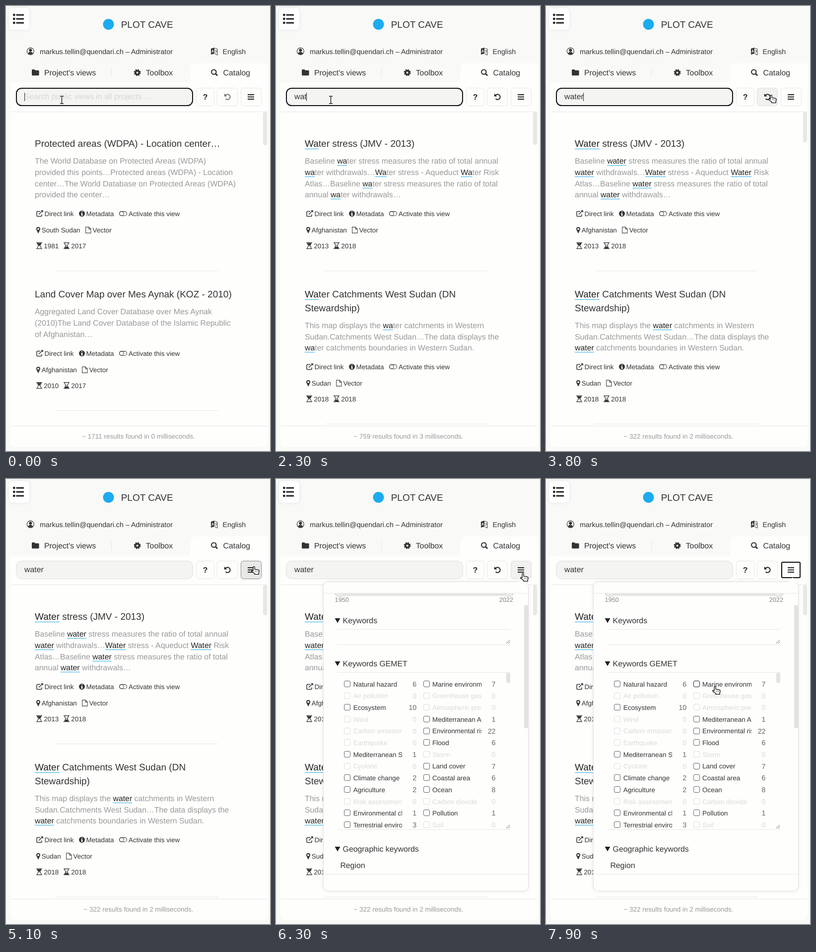
These frames come from a looping animation (532x898 px, 8 s). An HTML page:

```html
<!DOCTYPE html>
<html lang="en">
<head>
<meta charset="utf-8">
<title>Catalog search</title>
<style>
  html, body { margin: 0; width: 100%; height: 100%; overflow: hidden; background: #f9f9f8; }
  svg { display: block; width: 532px; height: 898px; }
  text { font-family: "Liberation Sans", Arial, sans-serif; white-space: pre; text-rendering: geometricPrecision; }
</style>
</head>
<body>
<svg id="stage" viewBox="0 0 532 898" xmlns="http://www.w3.org/2000/svg">
  <defs>
    <filter id="soft" x="-20%" y="-20%" width="140%" height="140%">
      <feDropShadow dx="0" dy="0" stdDeviation="3" flood-color="#000" flood-opacity=".09"/>
    </filter>
    <clipPath id="listClip"><path d="M9 214H527V847H9Z"/></clipPath>
    <clipPath id="labelClip"><path d="M156 391H254V707H156ZM315 391H414V707H315Z"/></clipPath>
    <clipPath id="optionClip"><path d="M124 391H472V707H124Z"/></clipPath>
    <clipPath id="sliderClip"><path d="M97 231H508V260H97Z"/></clipPath>
    <g id="i-link" fill="none" stroke="#333" stroke-width="1.5">
      <path d="M8 2.5H2.5Q1 2.5 1 4V11Q1 12.5 2.5 12.5H9.5Q11 12.5 11 11V8.5M5 8.5L12.5 1.5"/>
      <path d="M9 .3H13.8V5Z" fill="#333" stroke="none"/>
    </g>
    <g id="i-info">
      <circle cx="6" cy="6" r="6" fill="#333"/>
      <path d="M5 1.8H7.2V3.6H5ZM4.2 5H7.2V8.7H8V10H4.2V8.7H5V6.2H4.2Z" fill="#fff"/>
    </g>
    <g id="i-toggle" fill="none" stroke="#444" stroke-width="1.1">
      <rect x=".6" y=".6" width="14.8" height="8.6" rx="4.3"/><circle cx="4.9" cy="4.9" r="4.3"/>
    </g>
    <path id="i-pin" fill="#333" fill-rule="evenodd" d="M4 0A4 4 0 0 1 8 4C8 6 5.6 9 4.6 12Q4 13 3.4 12C2.4 9 0 6 0 4A4 4 0 0 1 4 0ZM4 2A2 2 0 1 0 4 6A2 2 0 1 0 4 2Z"/>
    <path id="i-file" fill="none" stroke="#444" stroke-width="1.1" d="M.6 .6H7L11 4.6V12.6H.6ZM7 .6V4.6H11"/>
    <path id="i-glass" fill="none" stroke="#333" stroke-width="1.2" d="M0 .6H12M0 12.6H12M2 1C2 4 4 5.5 5 6.6C4 7.7 2 9 2 12M10 1C10 4 8 5.5 7 6.6C8 7.7 10 9 10 12"/>
    <path id="sand-top" d="M2.3 1.5H9.7Q9 5 6 6.6Q3 5 2.3 1.5Z" fill="#333"/>
    <path id="sand-low" d="M2.3 12Q3 9 6 8.6Q9 9 9.7 12Z" fill="#333"/>
  </defs>
</svg>
<script>
const LOOP = 8000;
const BASE = 15.84, SMALL = BASE * .85, MID = BASE * .9, BIG = BASE * 1.2;
const INK = '#333', PALE = '#999', RULE = '#e7e7e6', BLUE = '#27abe8';
const stage = document.getElementById('stage');

function add(parent, tag, attrs = {}, content) {
  const el = document.createElementNS(stage.namespaceURI, tag);
  for (const key in attrs) el.setAttribute(key, attrs[key]);
  if (content !== undefined) el.textContent = content;
  return parent.appendChild(el);
}
const group = (parent, attrs) => add(parent, 'g', attrs);
const label = (parent, x, y, size, content, fill = INK, more = {}) =>
  add(parent, 'text', { x, y: Math.round(y), 'font-size': size, fill, ...more }, content);
const box = (parent, x, y, width, height, rx, fill, stroke = 'none', more = {}) =>
  add(parent, 'rect', { x, y, width, height, rx, fill, stroke, ...more });
const path = (parent, d, fill = 'none', stroke = 'none', width = 1) =>
  add(parent, 'path', { d, fill, stroke, 'stroke-width': width });
const rule = (parent, x1, x2, y) => path(parent, `M${x1} ${y + .5}H${x2}`, 'none', RULE);
const icon = (parent, name, x, y) => add(parent, 'use', { href: '#' + name, x, y });
const show = (el, on) => el.setAttribute('display', on ? 'inline' : 'none');

// Text whose words starting with `term` are darkened and underlined.
function marked(parent, x, y, size, content, fill, term, gap) {
  const el = label(parent, x, y, size, '', fill);
  const parts = term ? content.split(new RegExp(`\\b(${term})`, 'i')) : [content];
  const spans = [];
  let at = 0;
  parts.forEach((part, i) => {
    if (!part) return;
    add(el, 'tspan', i % 2 ? { fill: '#222' } : {}, part);
    if (i % 2) spans.push([at, at + part.length - 1]);
    at += part.length;
  });
  for (const [from, to] of spans) {
    const left = el.getStartPositionOfChar(from).x, right = el.getEndPositionOfChar(to).x;
    path(parent, `M${left} ${Math.round(y) + gap + .5}H${right}`, 'none', BLUE);
  }
}

function card(parent, top, item, term) {
  const titleStep = 27.5, bodyStep = 22.65;
  item.title.forEach((row, i) => marked(parent, 58, top + i * titleStep, BIG, row, INK, term, 4));
  let y = top + (item.title.length - 1) * titleStep + 34.4;
  item.body.forEach((row, i) => marked(parent, 58, y + i * bodyStep, BASE, row, PALE, term, 3));
  y = Math.round(y + (item.body.length - 1) * bodyStep + 37.9);
  icon(parent, 'i-link', 61, y - 12);
  label(parent, 77.5, y, SMALL, 'Direct link');
  icon(parent, 'i-info', 147, y - 11);
  label(parent, 161.5, y, SMALL, 'Metadata');
  icon(parent, 'i-toggle', 228, y - 10);
  label(parent, 247, y, SMALL, 'Activate this view');
  y += 33;
  icon(parent, 'i-pin', 61, y - 11);
  label(parent, 71.8, y, SMALL, item.place);
  icon(parent, 'i-file', item.fileX, y - 11.5);
  label(parent, item.fileX + 14.6, y, SMALL, 'Vector');
  y += 32;
  item.years.forEach((year, i) => {
    const x = 61 + i * 55;
    icon(parent, 'i-glass', x, y - 12);
    icon(parent, i ? 'sand-low' : 'sand-top', x, y - 12);
    label(parent, x + 15.2, y, SMALL, year);
  });
  rule(parent, 99, 427, y + 45);
}

function results(items, count, thumb, term) {
  const all = group(stage), list = group(all, { 'clip-path': 'url(#listClip)' });
  items.forEach((item, i) => card(list, 284 + i * 304, item, term));
  box(all, 518, 214, 8, thumb, 4, '#e7e7e6');
  label(all, 267, 873, SMALL, count, PALE, { 'text-anchor': 'middle' });
  return all;
}

// Page and header
box(stage, 0, 0, 532, 898, 0, '#f9f9f8');
path(stage, 'M9 154H371V128Q371 116 383 116H527V878Q527 890 515 890H21Q9 890 9 878Z', '#fefefd');
box(stage, 6, 4, 41, 44, 8, '#fefefe', 'none', { filter: 'url(#soft)' });
for (const y of [18, 26, 34]) {
  add(stage, 'circle', { cx: 16.3, cy: y, r: 2.4, fill: '#222' });
  path(stage, `M20.5 ${y}H36`, 'none', '#222', 3);
}
add(stage, 'circle', { cx: 206.5, cy: 37, r: 11, fill: '#1cabee' });
label(stage, 231.7, 44, BIG, 'PLOT CAVE');

add(stage, 'circle', { cx: 49.3, cy: 91.3, r: 7, fill: 'none', stroke: INK, 'stroke-width': 1.2 });
add(stage, 'circle', { cx: 49.3, cy: 89.2, r: 3, fill: INK });
path(stage, 'M44.3 95.5Q46 92.6 49.3 92.6T54.3 95.5Q49.3 100 44.3 95.5Z', INK);
label(stage, 68, 97, MID, 'markus.tellin@quendari.ch – Administrator');
path(stage, 'M413 86L420 84V96L413 98Z', INK);
path(stage, 'M420.5 85L426 87V99L420.5 96.5', 'none', INK, 1);
path(stage, 'M414.7 94.5L416.5 88L418.4 93.5M415.3 92.3L418 91.6', 'none', '#fff', 1);
path(stage, 'M421.5 90L425 91.2M423.2 89V91M422 95L424.6 91', 'none', INK, .9);
label(stage, 436.5, 97, MID, 'English');

path(stage, 'M52 129.5Q52 128 53.5 128H57Q58.5 128 58.5 129.8H65Q66.6 129.8 66.6 131.3V138.7Q66.6 140.2 65 140.2H53.5Q52 140.2 52 138.7Z', INK);
label(stage, 77, 140, BASE, "Project's views");
path(stage, 'M212.5 125V144', 'none', RULE);
add(stage, 'circle', { cx: 264.6, cy: 134.4, r: 3.7, fill: 'none', stroke: INK, 'stroke-width': 3.4 });
add(stage, 'circle', { cx: 264.6, cy: 134.4, r: 5.8, fill: 'none', stroke: INK, 'stroke-width': 2.4, 'stroke-dasharray': '2.6 1.955' });
label(stage, 281.7, 140, BASE, 'Toolbox');
add(stage, 'circle', { cx: 418.8, cy: 133.2, r: 4.7, fill: 'none', stroke: INK, 'stroke-width': 2.2 });
path(stage, 'M422.3 136.8L426.2 140.6', 'none', INK, 2.8);
label(stage, 437.6, 140, BASE, 'Catalog');

// Search row
box(stage, 20.5, 165.5, 356, 36, 11, '#f4f4f2', '#e0e0de');
const focusLine = box(stage, 21, 166, 355, 35, 10.5, 'none', '#111', { 'stroke-width': 2 });
const hint = label(stage, 37, 188, BASE, 'Search public views in all projects …', '#d6d6d4');
const query = label(stage, 37, 188, BASE, '');
const caret = path(stage, '', 'none', '#222');
const buttons = [[383, 37], [425, 42], [473, 42]].map(([x, w]) => ({
  x, w, el: box(stage, x + .5, 165.5, w - 1, 36, 5, '#fdfdfc', RULE)
}));
label(stage, 401.7, 189, BASE, '?', '#222', { 'text-anchor': 'middle', 'font-weight': 'bold' });
const undo = group(stage);
const undoArc = path(undo, 'M442.2 180.2A5.3 5.3 0 1 1 442.6 187.2', 'none', INK, 2);
const undoTip = path(undo, 'M439.8 176.8V182.6H445.6Z', INK);
path(stage, 'M487 179H500M487 183.5H500M487 188H500', 'none', '#222', 2);
const ring = box(stage, 475, 168, 37, 31, 2, 'none', '#111', { 'stroke-width': 2 });
rule(stage, 10, 527, 213);
rule(stage, 10, 527, 847);

// Result lists
const firstItems = [
  { title: ['Protected areas (WDPA) - Location center…'],
    body: ['The World Database on Protected Areas (WDPA)', 'provided this points…Protected areas (WDPA) - Location',
      'center…The World Database on Protected Areas (WDPA)', 'provided the center…'],
    place: 'South Sudan', fileX: 160, years: ['1981', '2017'] },
  { title: ['Land Cover Map over Mes Aynak (KOZ - 2010)'],
    body: ['Aggregated Land Cover Database over Mes Aynak', '(2010)The Land Cover Database of the Islamic Republic', 'of Afghanistan…'],
    place: 'Afghanistan', fileX: 153, years: ['2010', '2017'] }
];
const waterItems = [
  { title: ['Water stress (JMV - 2013)'],
    body: ['Baseline water stress measures the ratio of total annual', 'water withdrawals…Water stress - Aqueduct Water Risk',
      'Atlas…Baseline water stress measures the ratio of total', 'annual water withdrawals…'],
    place: 'Afghanistan', fileX: 153, years: ['2013', '2018'] },
  { title: ['Water Catchments West Sudan (DN', 'Stewardship)'],
    body: ['This map displays the water catchments in Western', 'Sudan.Catchments West Sudan…The data displays the',
      'water catchments boundaries in Western Sudan.'],
    place: 'Sudan', fileX: 121, years: ['2018', '2018'] }
];
const lists = [
  results(firstItems, '~ 1711 results found in 0 milliseconds.', 67),
  results(waterItems, '~ 759 results found in 3 milliseconds.', 66, 'wa'),
  results(waterItems, '~ 322 results found in 2 milliseconds.', 61, 'water')
];

// Filter popup
const popup = group(stage);
box(popup, 95.5, 207.5, 413, 624, 10, '#fefefd', '#e2e2e1', { filter: 'url(#soft)' });
path(popup, 'M488 209L497 198.5L506 209Z', '#fefefd');
rule(popup, 96, 508, 230);
const slider = group(popup, { 'clip-path': 'url(#sliderClip)' });
box(slider, 119, 229, 359, 6, 3, '#e6e6e5', '#d8d8d7');
for (const cx of [128.5, 468.5]) add(slider, 'circle', { cx, cy: 228, r: 9.5, fill: '#ececeb', stroke: '#d0d0cf' });
label(popup, 118.6, 248, BASE * .8, '1950', '#888');
label(popup, 449.8, 248, BASE * .8, '2022', '#888');
function section(y, content) {
  path(popup, `M118.5 ${y - 10}H129.5L124 ${y - .5}Z`, '#222');
  label(popup, 134.6, y, BASE, content);
}
const grip = (x, y) => path(popup, `M${x} ${y}L${x + 7} ${y - 7}M${x + 4} ${y}L${x + 7} ${y - 3}`, 'none', '#666');
section(291, 'Keywords');
rule(popup, 124, 472, 303);
rule(popup, 124, 472, 334);
grip(464, 332);
section(378, 'Keywords GEMET');
rule(popup, 124, 472, 390);
box(popup, 464, 391, 8, 21, 4, '#e2e2e1');

const options = [
  ['Natural hazard', 6, 'Marine environment', 7], ['Air pollution', 0, 'Greenhouse gas', 0],
  ['Ecosystem', 10, 'Atmospheric precipitation', 0], ['Wind', 0, 'Mediterranean Area', 1],
  ['Carbon emission', 0, 'Environmental risk', 22], ['Earthquake', 0, 'Flood', 6],
  ['Mediterranean Sea', 1, 'Storm', 0], ['Cyclone', 0, 'Land cover', 7],
  ['Climate change', 2, 'Coastal area', 6], ['Agriculture', 2, 'Ocean', 8],
  ['Risk assessment', 0, 'Carbon dioxide', 0], ['Environmental change', 1, 'Pollution', 1],
  ['Terrestrial environment', 3, 'Soil', 0]
];
const names = group(popup, { 'clip-path': 'url(#labelClip)' });
const marks = group(popup, { 'clip-path': 'url(#optionClip)' });
let hoverCheck;
options.forEach((row, i) => [0, 1].forEach(col => {
  const name = row[col * 2], count = row[col * 2 + 1], y = 414 + i * 23.67, x = col ? 297 : 137;
  const check = box(marks, x + .5, Math.round(y) - 6.5, 12, 12, 2.5, '#fff', count ? '#666' : '#ddd');
  if (name.startsWith('Marine')) hoverCheck = check;
  label(names, col ? 315 : 155.7, y + 4.8, SMALL, name, count ? INK : '#dadad9');
  label(marks, col ? 442.5 : 283.3, y + 5, MID, count, count ? '#666' : '#dadad9', { 'text-anchor': 'end' });
}));
rule(popup, 124, 472, 707);
grip(464, 705);
section(752, 'Geographic keywords');
label(popup, 129.4, 785, BASE, 'Region');
rule(popup, 96, 508, 797);
box(popup, 500, 254, 8.5, 249, 4, '#e2e2e1');

// Pointer shapes, each with its hot spot at the origin
const pointer = group(stage);
const beam = group(pointer, { transform: 'translate(.5 .5)' });
const beamPath = 'M-3.5 -7.5H-1.5L0 -6.5L1.5 -7.5H3.5M0 -6.5V6.5M-3.5 7.5H-1.5L0 6.5L1.5 7.5H3.5';
path(beam, beamPath, 'none', '#fff', 3);
path(beam, beamPath, 'none', '#111', 1.4);
const hand = group(pointer);
path(hand, 'M-2 8.5V1.2Q-2 -.4 -.4 -.4T1.2 1.2V5.2L7.5 6.1Q10.4 6.5 10.2 9L9.3 12.2V15.3H1V13.6L-4.8 9.6Q-5.8 8.4 -4.8 7.6Q-3.6 7 -2 8.5Z', '#fff', '#111', 1.3);
path(hand, 'M2.3 8V10M4.8 8.4V10.2M7.2 8.8V10.4', 'none', '#111', .9);
const arrow = path(pointer, 'M0 0V14L3.3 11L5.6 16L7.9 15L5.7 10.2H10Z', '#111', '#fff', 1);

const track = [
  [0, 112, 189], [100, 110, 189], [3300, 110, 189], [3400, 135, 188], [3500, 205, 186], [3600, 310, 183],
  [3700, 405, 181], [3800, 454, 180], [3900, 480, 179], [4000, 497, 177], [4100, 500, 177], [6200, 500, 177],
  [6400, 495, 205], [6600, 474, 295], [6800, 432, 382], [6900, 407, 409], [7000, 365, 415], [7100, 345, 418],
  [7300, 337, 418], [7400, 337, 418], [7500, 331, 420], [7700, 314, 423], [7900, 341, 419]
];
function pointerAt(t) {
  const next = track.findIndex(key => key[0] > t);
  if (next < 0) return track[track.length - 1].slice(1);
  const a = track[next - 1], b = track[next], k = (t - a[0]) / (b[0] - a[0]);
  return [1, 2].map(i => a[i] + (b[i] - a[i]) * k);
}

const typing = [1900, 2000, 2300, 2400, 2500];
const blinks = [300, 900, 1500, 1900, 3100, 3700, 4300, 4900];

function draw(time) {
  const t = Math.floor(time / 100) * 100;
  const passed = times => times.filter(at => t >= at).length;
  const focused = t < 4900, pressed = t >= 4900 && t < 5300, open = t >= 5300;

  query.textContent = 'water'.slice(0, passed(typing));
  show(hint, !query.textContent);
  show(focusLine, focused);
  show(caret, focused && passed(blinks) % 2 === 0);
  const end = Math.floor(37 + (query.textContent ? query.getComputedTextLength() : 0)) + .5;
  caret.setAttribute('d', `M${end} 175V192`);

  const current = passed([2300, 2800]);
  lists.forEach((list, i) => show(list, i === current));
  const tone = t < 2300 ? '#777' : '#222';
  undoArc.setAttribute('stroke', tone);
  undoTip.setAttribute('fill', tone);

  const [x, y] = pointerAt(t);
  const onRow = y < 203;
  buttons.forEach((button, i) => {
    const hover = onRow && x >= button.x && x < button.x + button.w, down = pressed && i === 2;
    button.el.setAttribute('fill', down ? '#e8e8e7' : hover ? '#f1f1f0' : '#fdfdfc');
    button.el.setAttribute('stroke', down ? '#8c8c8c' : hover ? '#dfdfde' : RULE);
  });
  show(ring, open && !onRow);
  show(popup, open);
  hoverCheck.setAttribute('stroke', y > 403 && x < 400 ? '#222' : '#666');

  pointer.setAttribute('transform', `translate(${Math.round(x)} ${Math.round(y)})`);
  const inField = onRow && x < 377, onTarget = onRow && x >= 383 || y > 403;
  show(beam, inField);
  show(hand, onTarget);
  show(arrow, !inField && !onTarget);
}

const start = performance.now();
function tick() {
  draw((performance.now() - start) % LOOP);
  requestAnimationFrame(tick);
}
tick();
</script>
</body>
</html>
```
